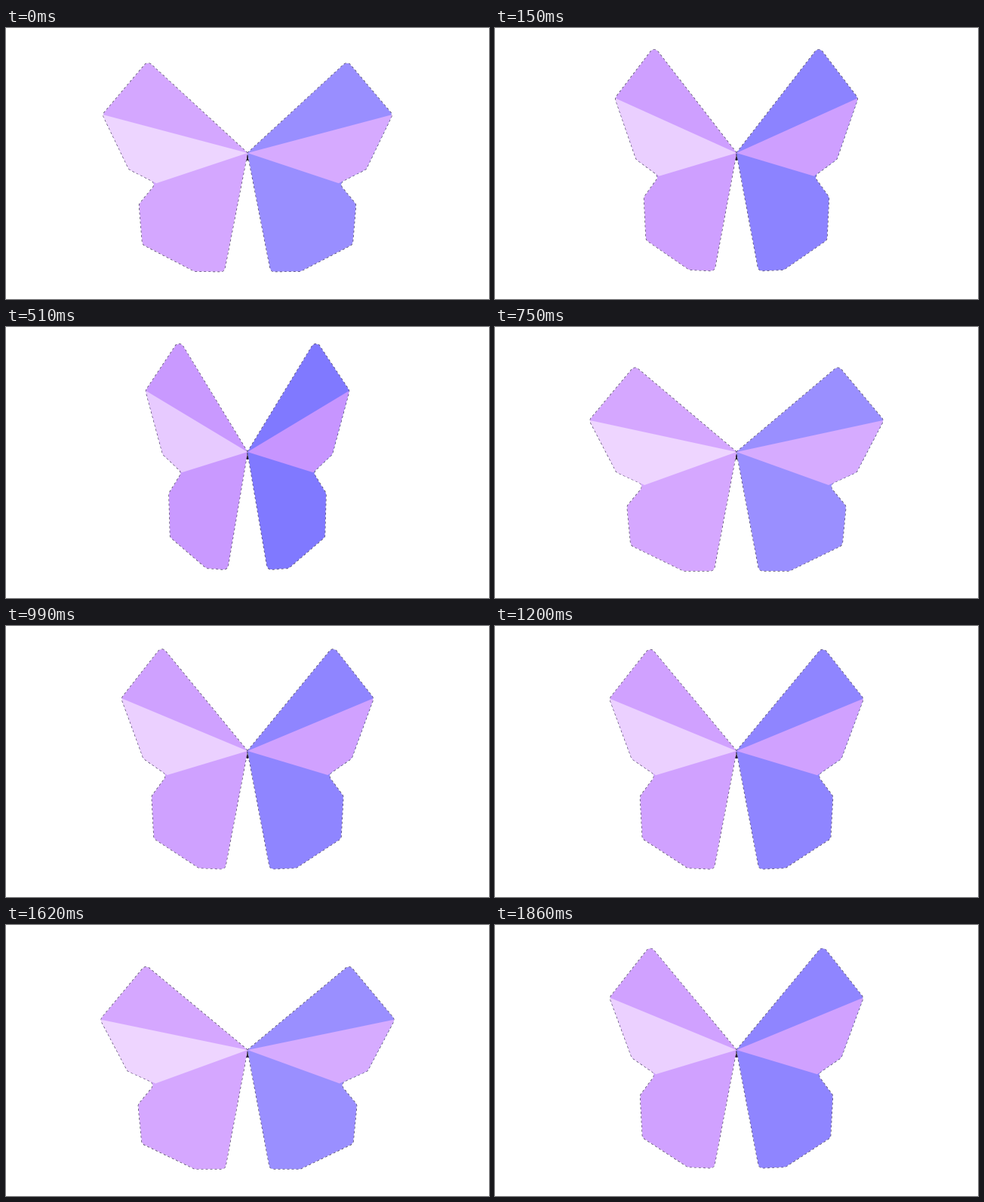
These frames come from a looping animation (640x360 px, 1890 ms). An HTML page with a canvas:

```html
<!DOCTYPE html>
<html lang="en">
<head>
<meta charset="utf-8">
<title>Butterfly</title>
<style>
html, body { margin: 0; width: 100%; height: 100%; overflow: hidden; background: #fff; }
canvas { display: block; }
</style>
</head>
<body>
<canvas id="stage" width="640" height="360"></canvas>
<script>
const ctx = document.getElementById('stage').getContext('2d');
const LOOP = 1890, REST = -1.5, FOLDED = 55;

// Corners of the spread wing, outward and down from the joint
const corners = [
  [135, -114], [195, -42], [159, 27], [122, 44],
  [145, 72], [140, 124], [70, 158], [30, 158]
];

// Turning points of the flap: time in ms, wing angle in degrees
const turns = [
  [-150, REST], [388, 58], [795, REST], [1100, 43],
  [1375, REST], [1620, REST], [2000, 43]
];

// Each turning point eases into the next along half a cosine wave
function angleAt(t) {
  const i = turns.findIndex(turn => turn[0] > t);
  const [t0, a] = turns[i - 1], [t1, b] = turns[i];
  return a + (b - a) * (1 - Math.cos(Math.PI * (t - t0) / (t1 - t0))) / 2;
}

// Turn a corner about the leaning body, with slight perspective
function project([u, v], angle) {
  const c = Math.cos(angle), s = Math.sin(angle);
  return [u * c + 0.05 * v * s, v - u * s * (0.24 - v / 950)];
}

function trace(pts, radius) {
  ctx.beginPath();
  ctx.moveTo(0, 0);
  pts.forEach(([x, y], i) => {
    const [nx, ny] = pts[i + 1] || [0, 0];
    ctx.arcTo(x, y, nx, ny, radius);
  });
  ctx.closePath();
}

function fill(color) {
  ctx.fillStyle = color;
  ctx.fill();
}

function drawWing(side, pts, main, middle) {
  ctx.save();
  ctx.scale(side, 1);
  trace(pts, 6);
  ctx.lineWidth = 1.4;
  ctx.setLineDash([3, 3]);
  ctx.strokeStyle = 'rgba(25, 15, 50, 0.75)';
  ctx.stroke();
  fill(main);
  ctx.clip();
  trace(pts.slice(1, 4), 0);
  fill(middle);
  ctx.restore();
}

function draw(t) {
  const angle = angleAt(t) * Math.PI / 180;
  const pts = corners.map(corner => project(corner, angle));
  const fold = (1 - Math.cos(angle)) / (1 - Math.cos(FOLDED * Math.PI / 180));
  const shade = (hue, light, depth) =>
    `hsl(${hue - 4 * fold}, 100%, ${light - depth * fold}%)`;

  ctx.fillStyle = '#fff';
  ctx.fillRect(0, 0, 640, 360);
  ctx.save();
  ctx.translate(320, 166);
  // Shadow in the gap under the joint
  trace([[1.5, 10], [-1.5, 10]], 0);
  fill('#2a2433');
  drawWing(-1, pts, shade(271, 82.8, 4), shade(275, 91.8, 3));
  drawWing(1, pts, shade(246, 78, 6), shade(271, 83.5, 6));
  ctx.restore();
}

const start = performance.now();
function tick() {
  draw((performance.now() - start) % LOOP);
  requestAnimationFrame(tick);
}
tick();
</script>
</body>
</html>
```
